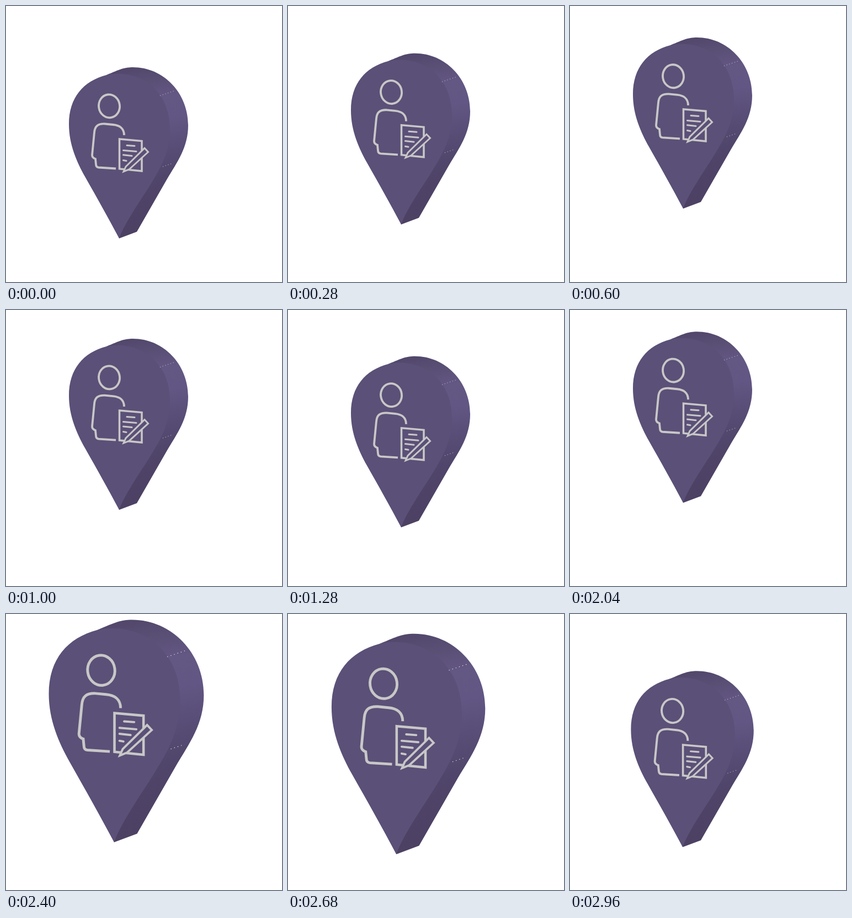
An HTML page for the animation above (3000 ms loop, 500 by 500 pixels).

```html
<!DOCTYPE html>
<html lang="en">
<head>
<meta charset="utf-8">
<title>Map pin</title>
<style>
  html, body { margin: 0; width: 100%; height: 100%; overflow: hidden; background: #fff; }
  svg { display: block; width: 100vw; height: 100vh; }
</style>
</head>
<body>
<svg viewBox="0 0 500 500">
  <defs>
    <linearGradient id="side" gradientUnits="userSpaceOnUse" x1="215" y1="112" x2="262" y2="408">
      <stop offset="0" stop-color="#52476b"/>
      <stop offset=".1" stop-color="#5a4f75"/>
      <stop offset=".2" stop-color="#635783"/>
      <stop offset=".34" stop-color="#625684"/>
      <stop offset=".5" stop-color="#594e77"/>
      <stop offset=".68" stop-color="#50456a"/>
      <stop offset="1" stop-color="#4c4163"/>
    </linearGradient>
  </defs>
  <g id="pin">
    <path fill="url(#side)" d="M205 420L237 408L291.500 313C310 282 330 255 330 215
      C330 156 285 110 230 110C214 110 207 113.500 182 124L170 200Z"/>
    <path fill="#5b5077" d="M205 420C185 382 165 347 143 308C128 281 114 250 114 213
      C114 165 140 135 182 124C240 112 297 150 297 222C297 262 282 290 262 322
      C244 351 215 392 205 420Z"/>
    <path fill="none" stroke="#fff" stroke-width=".8" stroke-dasharray="1 4"
      d="M279 161.500L307 152M284 290L303 283.500"/>
    <g fill="none" stroke="#c8c7c8" stroke-width="3.800">
      <ellipse cx="187" cy="180.300" rx="19" ry="21" transform="rotate(-8 187 180)"/>
      <path d="M214 233C214 221 206 215 194 214L179 212.500C166 212 161 217 160 228L156 269
        Q156 274 162 276L163 286Q163 291 168 291.500L199 293.500"/>
      <path d="M205.500 240L246 243.500V298L205.500 294Z" stroke-width="3.500"/>
      <g stroke-width="3" stroke-linecap="round">
        <path d="M219 251.500L233 252.500M212.500 260.500L236 262.500M212.500 268.800L228 270.500M212.500 278.500L218 279.500"/>
        <path d="M213 299L217 290L251 256.500L257.500 263.500L223 295Z" fill="#5b5077"/>
      </g>
    </g>
  </g>
</svg>
<script>
  const LOOP = 3000, STEP = 40;
  const PIVOT = { x: 235.5, y: 203 };
  const REST_Y = 204;
  // [time in ms, value] keys, joined linearly
  const LIFT = [[0, 0], [805, 72.5], [880, 72.5], [1520, 0], [1555, 0],
                [2045, 72.5], [2525, 72.5], [2993, 0], [LOOP, 0]];
  const SCALE = [[0, 1], [2040, 1], [2370, 1.3], [2668, 1.3], [2992, 1], [LOOP, 1]];
  const pin = document.getElementById('pin');

  function valueAt(keys, t) {
    const i = keys.findIndex(key => key[0] > t);
    const [t0, v0] = keys[i - 1], [t1, v1] = keys[i];
    return v0 + (v1 - v0) * (t - t0) / (t1 - t0);
  }

  function draw(time) {
    const t = Math.floor((time % LOOP) / STEP) * STEP;
    const y = REST_Y - valueAt(LIFT, t);
    pin.setAttribute('transform',
      `translate(${PIVOT.x} ${y}) scale(${valueAt(SCALE, t)}) translate(${-PIVOT.x} ${-PIVOT.y})`);
  }

  const start = performance.now();
  function tick() {
    draw(performance.now() - start);
    requestAnimationFrame(tick);
  }
  tick();
</script>
</body>
</html>
```
